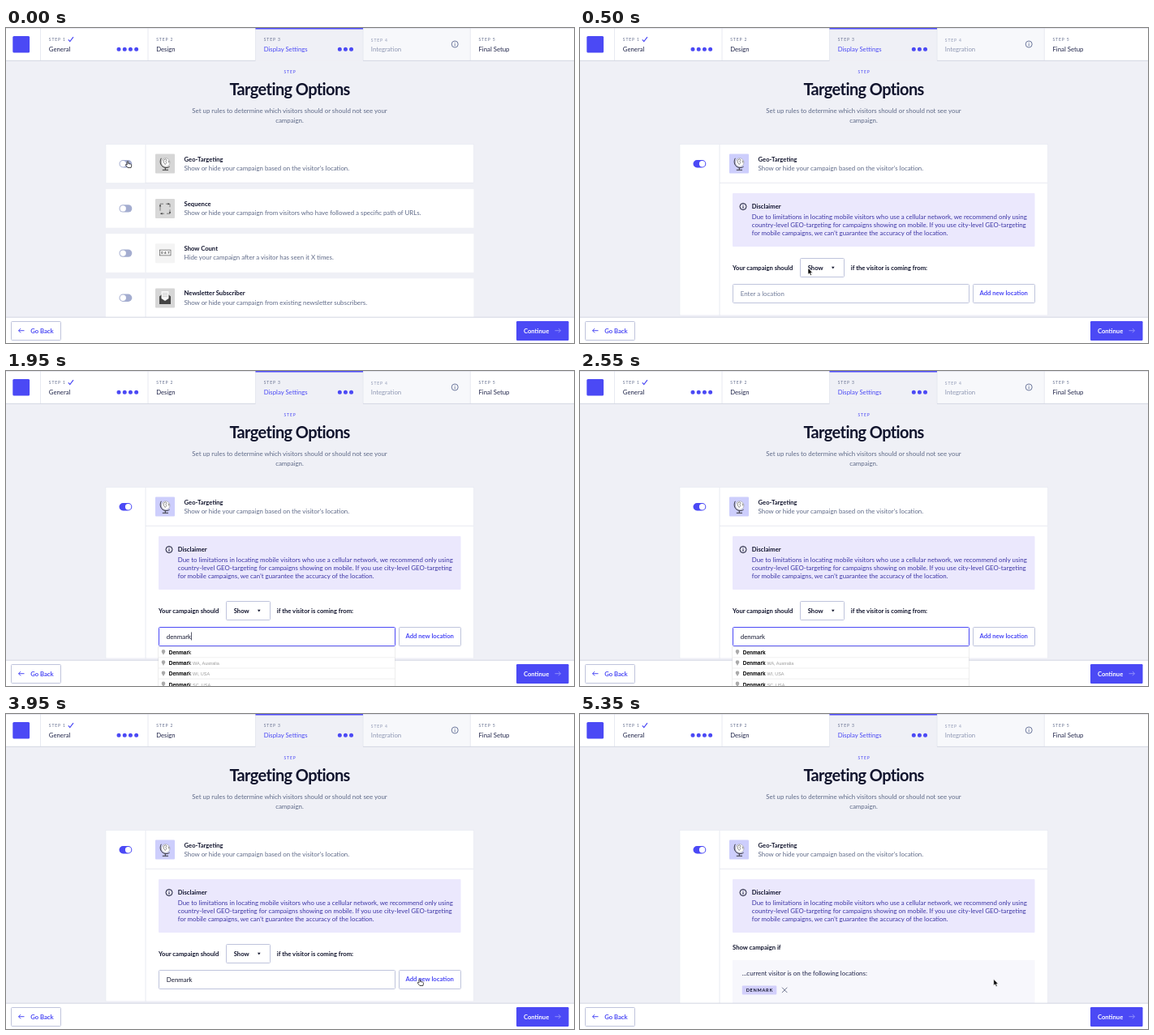
Write an HTML page that moves like this. It is 700x389 px and loops after 5.4 s.

```html
<!DOCTYPE html>
<html lang="en">
<head>
<meta charset="utf-8">
<title>Targeting Options</title>
<style>
  html, body { margin: 0; width: 100%; height: 100%; overflow: hidden; background: #eff0f6; }
  svg { display: block; width: 100vw; height: 100vh; }
  text { font: 7.88px Lato, sans-serif; fill: #5f6a88; white-space: pre; }
  .bold { font-weight: 700; font-size: 7.65px; fill: #11142d; }
  .nav { font-size: 7.75px; fill: #20254a; }
  .step { font-size: 5px; letter-spacing: .9px; fill: #66708f; }
  .title { font-size: 20px; font-weight: 700; letter-spacing: -.61px; fill: #11142d; }
  .mid { text-anchor: middle; }
  .note { fill: #3c35a5; }
  .dark { fill: #20254a; }
  .pale { fill: #8e97b3; }
  .blue { fill: #4b49f5; }
  .white { fill: #fff; }
  .box { fill: #fff; stroke: #bfc4dc; }
  .edge { stroke: #e3e5ee; stroke-width: .8; fill: none; }
  .line { fill: none; stroke: #4b49f5; stroke-width: 1; }
  .ink { fill: none; stroke: #444; stroke-width: .6; }
  .place { font: 700 6.5px "Liberation Sans", Arial, sans-serif; fill: #000; }
  .place .rest { font-weight: 400; }
  .place .area { font-weight: 400; font-size: 5.5px; fill: #999; }
</style>
</head>
<body>
<svg viewBox="0 0 700 389" preserveAspectRatio="none">
  <defs>
    <clipPath id="reveal"><rect id="revealBox" x="122" y="143" width="456"/></clipPath>
    <g id="card">
      <rect x="123" y="143.7" width="453.4" height="47.8" fill="#fff"/>
      <path class="edge" d="M172 143.700v47.800"/>
    </g>
    <g id="off">
      <rect x="139.500" y="163" width="15.800" height="9.400" rx="4.700" fill="#a4add0"/>
      <circle class="white" cx="144.200" cy="167.700" r="3.700"/>
    </g>
    <path id="arrowLine" d="M0 0h7M4.400 -2.600L7 0 4.400 2.600"/>
    <g id="info">
      <circle r="4" fill="none"/>
      <path d="M0 -.4v2.600M0 -2.200v.9"/>
    </g>
    <path id="pin" d="M0 3.400C-.6 1.600 -2.300 .6 -2.300 -1a2.300 2.300 0 0 1 4.600 0C2.300 .6 .6 1.600 0 3.400z" fill="#aaa"/>
  </defs>

  <rect width="700" height="389" fill="#eff0f6"/>
  <text class="step mid blue" x="350" y="55.600">STEP</text>
  <text class="title mid" x="349.600" y="83.300">Targeting Options</text>
  <text class="mid" x="349.500" y="105">Set up rules to determine which visitors should or should not see your</text>
  <text class="mid" x="349.500" y="117">campaign.</text>

  <g id="others">
    <g transform="translate(0 55.2)">
      <use href="#card"/><use href="#off"/>
      <rect x="184" y="155.800" width="24" height="24" rx="1" fill="#d8d8d8"/>
      <path class="ink" d="M190 170.500v-8.500h4M197 162h5v4M202 169v5h-4M195 174h-5"/>
      <path d="M188.800 165l1.200-2 1.200 2zM200.800 172l1.200 2 1.200-2zM199.500 160.800l2 1.200-2 1.200zM192.500 172.800l-2 1.200 2 1.200z" fill="#333"/>
      <text class="bold" x="219.600" y="164.500">Sequence</text>
      <text x="219.600" y="176">Show or hide your campaign from visitors who have followed a specific path of URLs.</text>
    </g>
    <g transform="translate(0 110.4)">
      <use href="#card"/><use href="#off"/>
      <rect x="184" y="155.800" width="24" height="24" rx="1" fill="#f4f4f4"/>
      <rect class="ink" x="189.500" y="163.700" width="13.500" height="6.800"/>
      <text x="191.300" y="168.500" style="font:700 3.800px Lato,sans-serif;letter-spacing:1.800px;fill:#222">067</text>
      <text class="bold" x="219.600" y="164.500">Show Count</text>
      <text x="219.600" y="176">Hide your campaign after a visitor has seen it X times.</text>
    </g>
    <g transform="translate(0 165.6)">
      <use href="#card"/><use href="#off"/>
      <rect x="184" y="155.800" width="24" height="24" rx="1" fill="#d6d6d6"/>
      <path d="M189 166l7-5.500 7 5.500v9.500h-14z" fill="#444"/>
      <path d="M191.500 159.500h9v9l-4.500 3-4.500-3z" fill="#f6f6f6"/>
      <path d="M193 162h6M193 164h6M193 166h6" stroke="#aaa" stroke-width=".5"/>
      <text class="bold" x="219.600" y="164.500">Newsletter Subscriber</text>
      <text x="219.600" y="176">Show or hide your campaign from existing newsletter subscribers.</text>
    </g>
  </g>

  <g clip-path="url(#reveal)">
    <rect id="panel" x="123" y="143.700" width="453.400" fill="#fff" stroke="#e4e6ef" stroke-width=".5"/>
    <path class="edge" d="M172 144v230M172 191.300h404"/>
    <rect id="pill" x="139.500" y="163" width="15.800" height="9.400" rx="4.700"/>
    <circle id="knob" class="white" cy="167.700" r="3.700"/>
    <rect id="tile" x="184" y="155.600" width="24" height="24" rx="1"/>
    <circle cx="196.800" cy="166" r="5.200" fill="#fff" stroke="#777" stroke-width=".4"/>
    <path class="ink" d="M194 163.500l2.500-1.700 1.500 1.200-1.200 1.800 1 1.700-1.600 2-1.500-1.800zM199.500 164l1.500.5-.3 2.200"/>
    <path class="ink" style="stroke:#222;stroke-width:.9" d="M191.300 160.800c-2.600 4.600-.6 10.800 5 11.700 2.100.3 3.900-.2 5.300-1.400M196.300 172.500v2.400M192.800 175.300h7.200"/>
    <text class="bold" x="219.600" y="164.500">Geo-Targeting</text>
    <text x="219.600" y="176">Show or hide your campaign based on the visitor’s location.</text>

    <rect x="188" y="204" width="372.500" height="66" rx="1" fill="#ebe8fd"/>
    <use href="#info" x="201" y="220.500" stroke="#11142d"/>
    <text class="bold" x="211.800" y="223.300">Disclaimer</text>
    <text class="note" x="211.800" y="235.800">Due to limitations in locating mobile visitors who use a cellular network, we recommend only using</text>
    <text class="note" x="211.800" y="246.100">country-level GEO-targeting for campaigns showing on mobile. If you use city-level GEO-targeting</text>
    <text class="note" x="211.800" y="256.400">for mobile campaigns, we can’t guarantee the accuracy of the location.</text>

    <g id="form">
      <text class="bold" x="188" y="298.800">Your campaign should</text>
      <rect class="box" x="271.500" y="284.500" width="54" height="23" rx="1"/>
      <text class="bold" x="280.700" y="298.800">Show</text>
      <path d="M310 294.700h3.600l-1.800 2.800z" fill="#11142d"/>
      <text class="bold" x="333.800" y="298.800">if the visitor is coming from:</text>
      <rect id="field" class="box" x="188.500" y="316.500" width="291" height="23" rx="1"/>
      <text id="value" x="197.800" y="330.500"></text>
      <rect id="caret" y="322.500" width=".7" height="10"/>
      <rect class="box" x="484.500" y="316.500" width="76" height="23" rx="1"/>
      <text class="bold blue mid" x="522.200" y="330.400">Add new location</text>
    </g>
    <g id="result">
      <text class="bold" x="188" y="290.800">Show campaign if</text>
      <rect x="188" y="304" width="372.500" height="80" fill="#f7f7fc"/>
      <text class="dark" x="199.800" y="322.500">...current visitor is on the following locations:</text>
      <rect x="199.800" y="335.600" width="42.500" height="10.800" rx="1" fill="#d2cffb"/>
      <text class="bold mid" x="221.300" y="343.100" style="font-size:5.600px;letter-spacing:.7px">DENMARK</text>
      <path d="M249 337.700l6.400 6.400M255.400 337.700l-6.400 6.400" stroke="#4d5675" stroke-width=".8"/>
    </g>
  </g>

  <rect width="700" height="40" fill="#fff"/>
  <rect x="307.500" width="132.500" height="40.500" fill="#eff0f6"/>
  <rect x="440" width="132" height="40" fill="#f7f8fb"/>
  <path class="edge" d="M42.500 0v40M175 0v40M307.500 0v40M440 0v40M572.300 0v40"/>
  <path d="M0 40.400h307.500M440 40.400h260" stroke="#cfd2df" stroke-width=".8"/>
  <path d="M0 .3h700" stroke="#c9ccda" stroke-width=".6"/>
  <rect class="blue" x="307.500" width="132.500" height="1.500"/>
  <rect class="blue" x="8.300" y="10" width="20.800" height="20.600" rx="1.500"/>
  <text class="step" x="52.800" y="15.800">STEP 1</text>
  <path class="line" style="stroke-width:1.200" d="M76.800 14.300l2 2.300 4.200-5.400"/>
  <text class="nav" x="52.800" y="28.800">General</text>
  <text class="step" x="185.200" y="15.800">STEP 2</text>
  <text class="nav" x="185.200" y="28.800">Design</text>
  <text class="step" x="317.700" y="15.800">STEP 3</text>
  <text class="nav blue" x="317.700" y="28.800">Display Settings</text>
  <text class="step pale" x="449.800" y="16.500">STEP 4</text>
  <text class="nav pale" x="449.800" y="28.800">Integration</text>
  <text class="step" x="582.500" y="15.800">STEP 5</text>
  <text class="nav" x="582.500" y="28.800">Final Setup</text>
  <path d="M139 26.200h.01m7.200 0h.01m7.200 0h.01m7.200 0h.01M411.300 26.200h.01m7.100 0h.01m7.100 0h.01" stroke="#4b49f5" stroke-width="5" stroke-linecap="round"/>
  <use href="#info" x="553.200" y="20" stroke="#4c5a86" stroke-width=".8"/>

  <rect y="357" width="700" height="32" fill="#fff"/>
  <path d="M0 357.200h700" stroke="#cfd2df" stroke-width=".9"/>
  <rect class="box" x="6.500" y="362.500" width="61" height="23" rx="1"/>
  <use href="#arrowLine" class="line" transform="translate(22.5 373.7) scale(-1 1)"/>
  <text class="bold blue" x="30.200" y="376.600">Go Back</text>
  <rect class="blue" x="629" y="362" width="64.500" height="24" rx="1.200"/>
  <text class="bold white" x="638" y="376.600">Continue</text>
  <use href="#arrowLine" x="676.500" y="373.700" fill="none" stroke="#8f8efa"/>

  <g id="list">
    <rect x="187.300" y="340.500" width="292.500" height="49" fill="#000" opacity=".12"/>
    <rect x="187.800" y="340" width="291.500" height="49" fill="#fff"/>
    <rect id="hover" x="187.800" y="340.500" width="291.500" height="13.300" fill="#f8f8f8"/>
    <path d="M187.800 340.300h291.500" stroke="#d9d9d9" stroke-width=".6"/>
    <g id="places"></g>
  </g>

  <g id="arrow"><path d="M0 0v7.800l1.800-1.600 1.200 2.800 1.400-.6-1.200-2.700h2.400z" fill="#000" stroke="#fff" stroke-width=".6"/></g>
  <g id="hand"><path d="M-.8 .6q.8-1.200 1.600 0v2.400l3 .6q1 .3.900 1.500l-.6 2.900h-4l-2.700-3.300q0-1.200 1.300-.6l.5.500z" fill="#fff" stroke="#000" stroke-width=".7"/></g>
  <g id="beam"><path d="M-1.700 -3.500q1.700 0 1.700 1v5q0 1 1.700 1M1.700 -3.500q-1.700 0-1.700 1M0 2.500q0 1-1.700 1" fill="none" stroke="#111" stroke-width=".8"/></g>
</svg>
<script>
  const LOOP = 5400, STEP = 50;
  const WORD = "denmark";
  const KEYS = [1250, 1370, 1480, 1600, 1700, 1820, 1930];
  const PICK = 3250, ADD = 4450, FOCUS = 900, LIST = 1750;
  const CLOSED = 47.8, OPEN = 211.2, FILLED = 240;
  const AREAS = ["", "WA, Australia", "WI, USA", "SC, USA"];
  // time, x, y of the pointer's hot spot
  const PATH = [
    [0, 150, 164.5], [150, 150, 164.5], [500, 281, 296.5], [600, 282, 299],
    [900, 300, 339], [2700, 300, 339], [3000, 296.5, 350.5], [3300, 296.5, 350.5],
    [3850, 509.8, 327.5], [LOOP, 509.8, 327.5]
  ];
  // pointer shape from each time on
  const SHAPES = [[0, "hand"], [200, "arrow"], [750, "beam"], [1250, ""],
    [2700, "beam"], [2800, "arrow"], [3700, "hand"], [ADD, "arrow"]];

  const $ = id => document.getElementById(id);
  const set = (id, name, value) => $(id).setAttribute(name, value);
  const show = (id, on) => set(id, "display", on ? "inline" : "none");
  const ease = p => p * p * (3 - 2 * p);
  const ramp = (t, from, to) => ease(Math.min(1, Math.max(0, (t - from) / (to - from))));
  const mix = (a, b, p) => a + (b - a) * p;
  const blend = (a, b, p) => `rgb(${a.map((v, i) => Math.round(mix(v, b[i], p)))})`;
  const typedAt = t => KEYS.filter(k => k <= t).length;

  $("places").innerHTML = AREAS.map((area, i) => {
    const y = 350 + i * 13.2;
    return `<path d="M187.8 ${y + 3.8}h291.5" stroke="#e6e6e6" stroke-width=".6"/>
      <use href="#pin" x="194" y="${y - 2.7}"/>
      <text class="place" x="200.8" y="${y}"><tspan class="hit"></tspan><tspan class="rest"></tspan><tspan class="area" dx="1.8">${area}</tspan></text>`;
  }).join("");
  const hits = document.querySelectorAll(".hit"), rests = document.querySelectorAll(".rest");

  function drawPointer(t) {
    const i = PATH.findIndex((p, n) => n && t < p[0]);
    const [t0, x0, y0] = PATH[i - 1], [t1, x1, y1] = PATH[i];
    const p = ramp(t, t0, t1);
    const shape = SHAPES.filter(s => s[0] <= t).pop()[1];
    for (const id of ["arrow", "hand", "beam"]) {
      show(id, id === shape);
      set(id, "transform", `translate(${mix(x0, x1, p)} ${mix(y0, y1, p)})`);
    }
  }

  function drawCard(t) {
    const on = ramp(t, 50, 200), open = ramp(t, 100, 350), done = t >= ADD;
    const height = done ? FILLED : mix(CLOSED, OPEN, open);
    set("panel", "height", height);
    set("revealBox", "height", height + 1);
    set("others", "transform", `translate(0 ${height - CLOSED})`);
    set("pill", "fill", blend([164, 173, 208], [75, 73, 245], on));
    set("knob", "cx", mix(144.2, 150.6, on));
    set("tile", "fill", blend([214, 214, 214], [205, 206, 252], on));
    show("form", !done);
    show("result", done);
  }

  function drawField(t) {
    const focused = t >= FOCUS && t < PICK + 100, count = typedAt(t);
    const value = $("value");
    value.textContent = t < FOCUS ? "Enter a location" : t < PICK ? WORD.slice(0, count) : "Denmark";
    value.style.fill = t < FOCUS ? "#6f7a98" : "#11142d";
    $("field").style.stroke = focused ? "#4b49f5" : "#bfc4dc";

    const last = count ? KEYS[count - 1] : FOCUS;
    show("caret", focused && (t - last) % 1000 < 500);
    set("caret", "x", 198 + (count ? value.getComputedTextLength() : .2));
    set("caret", "fill", count ? "#11142d" : "#4b49f5");

    const bold = typedAt(t - 50);
    hits.forEach(e => e.textContent = "Denmark".slice(0, bold));
    rests.forEach(e => e.textContent = "Denmark".slice(bold));
    show("list", t >= LIST && t < PICK);
    show("hover", t >= 2900);
  }

  const start = performance.now();
  function frame() {
    const t = Math.floor((performance.now() - start) % LOOP / STEP) * STEP;
    drawCard(t);
    drawField(t);
    drawPointer(t);
    requestAnimationFrame(frame);
  }
  frame();
</script>
</body>
</html>
```
